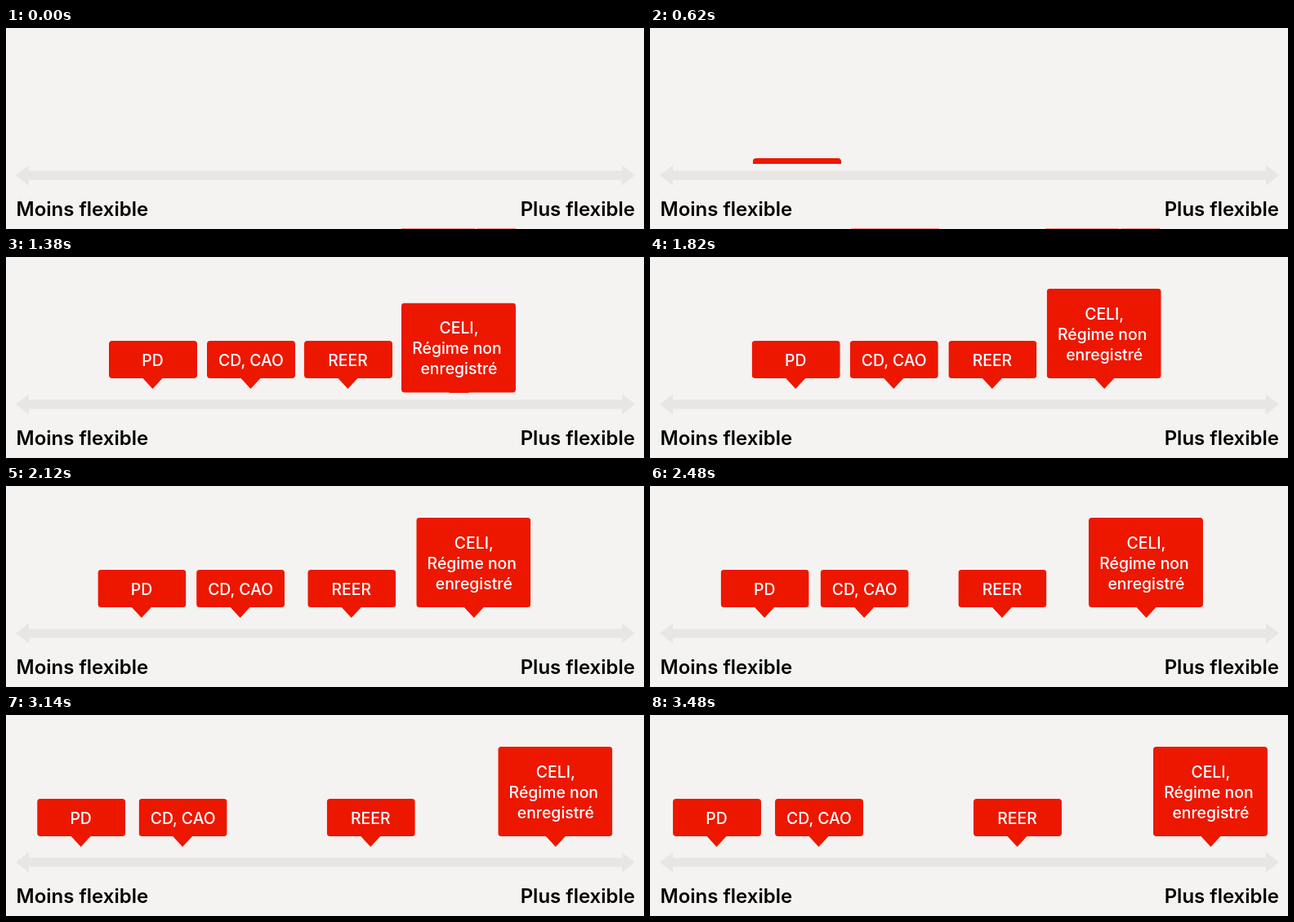
Animation, 781 px wide and 247 px high, one loop 3600 ms. Source, as an HTML page:

```html
<!DOCTYPE html>
<html lang="fr">
<head>
<meta charset="utf-8">
<title>Flexibilité</title>
<style>
  html, body { margin: 0; width: 100%; height: 100%; overflow: hidden; background: #f4f3f1; }
  svg { display: block; }
  text { font-family: Inter, sans-serif; }
  .end { font-size: 24px; font-weight: 600; fill: #000; }
  .tag { fill: #ed1700; }
  .tag text { font-size: 19.4px; font-weight: 500; fill: #fff; text-anchor: middle; }
</style>
</head>
<body>
<svg width="781" height="247" viewBox="0 0 781 247">
  <g id="tags"></g>
  <!-- hides the tags until they rise above the axis -->
  <rect y="167" width="781" height="79.55" fill="#f4f3f1"/>
  <path d="M12 181 28 168.5V175.5H754V168.5L770 181 754 193.5V186.5H28V193.5Z" fill="#e8e6e2"/>
  <text class="end" x="12.5" y="231">Moins flexible</text>
  <text class="end" x="770" y="231" text-anchor="end">Plus flexible</text>
</svg>
<script>
const LOOP = 3600, RISE = 880, DROP = 169, STAGGER = 200;
const SPREAD = [1700, 3500];
const riseEase = 'cubic-bezier(.333, 0, .833, 1)';
const spreadEase = 'cubic-bezier(.333, 0, .667, 1)';

// lines: [text, centre x, baseline y] relative to the box
const tags = [
  { from: 126, to: 28, y: 103, w: 108, h: 46, tip: 53.5, lines: [['PD', 53.5, 31]] },
  { from: 246, to: 153, y: 103, w: 108, h: 46, tip: 53.5, lines: [['CD, CAO', 54, 31]] },
  { from: 365, to: 396, y: 103, w: 108, h: 46, tip: 53.5, lines: [['REER', 53.5, 31]] },
  { from: 484, to: 616, y: 39, w: 140, h: 110, tip: 70.5,
    lines: [['CELI,', 70.5, 38], ['Régime non', 68, 63], ['enregistré', 70.5, 88]] }
];

function el(name, attrs, parent) {
  const node = document.createElementNS('http://www.w3.org/2000/svg', name);
  for (const key in attrs) node.setAttribute(key, attrs[key]);
  return parent.appendChild(node);
}

function move(node, axis, a, b, start, end, easing) {
  const at = v => `translate${axis}(${v}px)`;
  node.animate([
    { offset: 0, transform: at(a) },
    { offset: start / LOOP, transform: at(a), easing },
    { offset: end / LOOP, transform: at(b) },
    { offset: 1, transform: at(b) }
  ], { duration: LOOP, iterations: Infinity });
}

const root = document.getElementById('tags');
tags.forEach((tag, i) => {
  const outer = el('g', { class: 'tag' }, root);
  const inner = el('g', {}, outer);
  el('rect', { width: tag.w, height: tag.h, rx: 4 }, inner);
  el('path', { d: `M${tag.tip - 13} ${tag.h - 1}h26l-1 1-12 13-12-13z` }, inner);
  for (const [text, x, y] of tag.lines) el('text', { x, y }, inner).textContent = text;

  const start = 20 + i * STAGGER;
  move(outer, 'X', tag.from, tag.to, ...SPREAD, spreadEase);
  move(inner, 'Y', tag.y + DROP, tag.y, start, start + RISE, riseEase);
});
</script>
</body>
</html>
```
